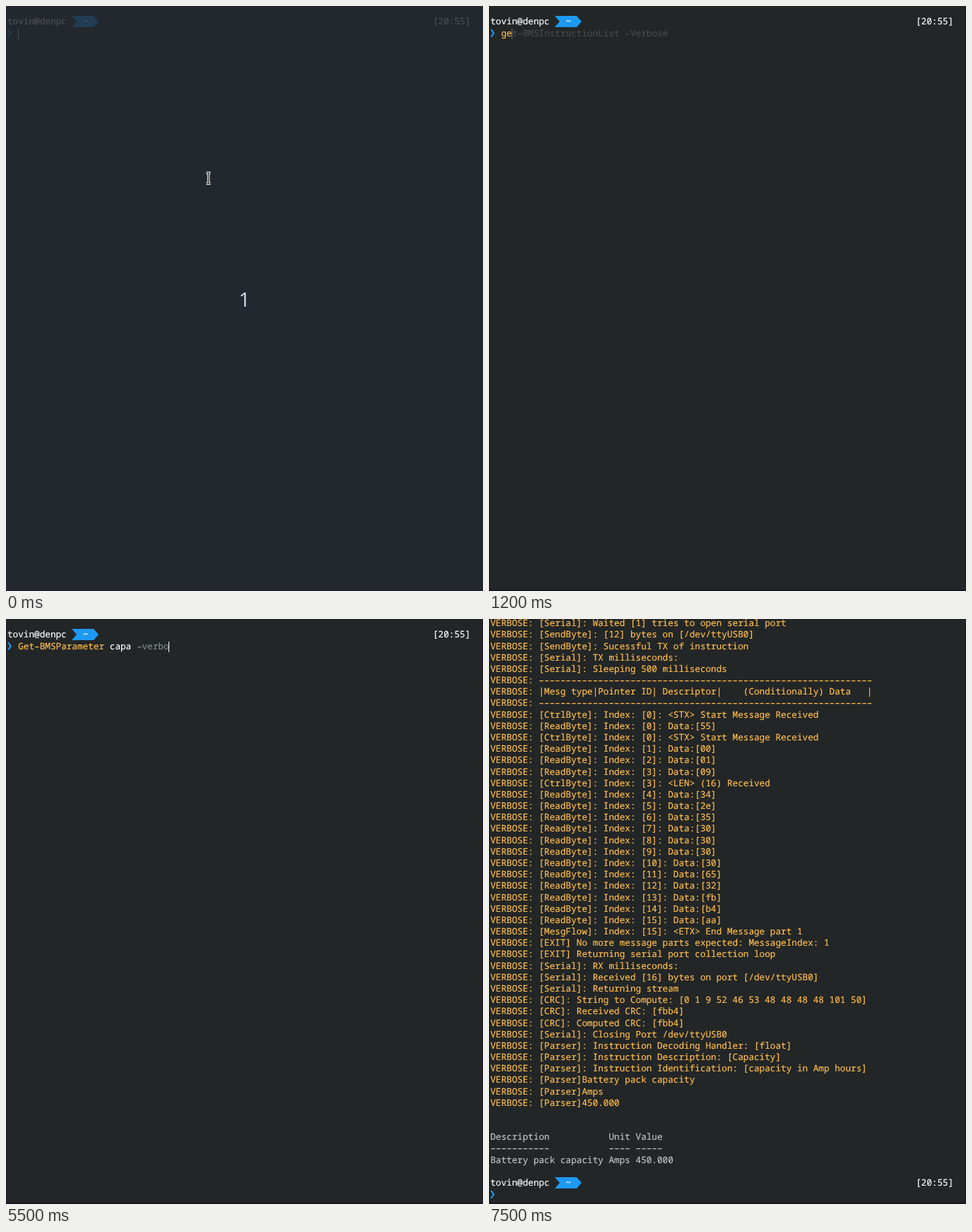
These frames come from a looping animation (675 by 829 pixels, 8000 ms). An HTML page:

```html
<!DOCTYPE html>
<html lang="en">
<head>
<meta charset="utf-8">
<title>Terminal session</title>
<style>
html, body { margin: 0; width: 675px; height: 829px; overflow: hidden; background: #232627; }
#stage { position: relative; width: 675px; height: 829px; overflow: hidden; }
#term, #desk, #veil { position: absolute; inset: 0; overflow: hidden; }
#term {
  background: #232627;
  font: 500 12.7px/14.2px "Noto Sans Mono", "DejaVu Sans Mono", monospace;
  text-rendering: geometricPrecision;
  font-variant-ligatures: none;
  -webkit-text-stroke: .2px;
}
#term span { position: absolute; white-space: pre; }
#term i { position: absolute; background: #1d99f3; }
#term .tag { width: 38px; height: 16px; clip-path: polygon(0 0, 31px 0, 100% 50%, 31px 100%, 0 100%, 7px 50%); }
#term .mark { width: 6px; height: 11px; clip-path: polygon(0 0, 35% 0, 100% 50%, 35% 100%, 0 100%, 55% 50%); }
#term .caret { width: 1px; height: 15px; }
#edge { position: absolute; inset: 0; border: solid #1a1526; border-width: 0 1px 2px; }
#veil { background: #242930; }
#count {
  position: absolute; left: 0; top: 396px; width: 675px; text-align: center;
  font: 28px/38px "Noto Sans", "Open Sans", sans-serif; color: #cbd3e2;
}
#mouse { position: absolute; left: 282px; top: 234px; }
#desk { width: 675px; height: 829px; font-family: "Noto Sans", "Open Sans", sans-serif; }
</style>
</head>
<body>
<div id="stage">
  <div id="term"></div>
  <div id="edge"></div>
  <div id="veil"></div>
  <div id="count">1</div>
  <svg id="mouse" width="9" height="20" fill="none">
    <path d="M1.500 2.500H7.500M1.500 17.500H7.500M4.500 2.500V17.500" stroke="#f4f4f4" stroke-width="3.400"/>
    <path d="M1.500 2.500H7.500M1.500 17.500H7.500M4.500 2.500V17.500" stroke="#16181a" stroke-width="1.200"/>
  </svg>
  <svg id="desk" viewBox="0 0 675 829">
    <defs>
      <radialGradient id="glow" gradientUnits="userSpaceOnUse" cx="0" cy="0" r="1" gradientTransform="translate(0 70) scale(610 1130)">
        <stop offset="0" stop-color="#a0184b"/>
        <stop offset=".25" stop-color="#7a1546"/>
        <stop offset=".5" stop-color="#561240"/>
        <stop offset=".75" stop-color="#3e1038"/>
        <stop offset="1" stop-color="#2a0d30"/>
      </radialGradient>
      <radialGradient id="halo">
        <stop offset="0" stop-color="#d65f88" stop-opacity=".7"/>
        <stop offset=".4" stop-color="#c23f72" stop-opacity=".35"/>
        <stop offset="1" stop-color="#c23f72" stop-opacity="0"/>
      </radialGradient>
      <radialGradient id="ember">
        <stop offset="0" stop-color="#b4601f" stop-opacity=".35"/>
        <stop offset="1" stop-color="#b4601f" stop-opacity="0"/>
      </radialGradient>
    </defs>
    <rect width="675" height="829" fill="url(#glow)"/>
    <path d="M490 470V829H260Z" fill="#220b2b" opacity=".6"/>
    <path d="M490 530V575L335 829H307Z" fill="#46164a" opacity=".25"/>
    <g id="mesh"></g>
    <g id="dots"></g>
    <g id="hexes"></g>
    <path d="M405 803L413 793L427 806L417 817Z" fill="#432452"/>
    <path d="M440 811L457 802V821Z" fill="none" stroke="#b06020" stroke-width="2.500"/>
    <path d="M474 824L482 812L497 829M505 822L521 813L529 826" fill="none" stroke="#7a1544" stroke-width="1.500"/>
    <circle cx="461" cy="780" r="4.500" fill="none" stroke="#8c1743" stroke-width="3"/>
    <circle cx="450" cy="728" r="2.500" fill="#a51c48"/>
    <circle cx="480" cy="656" r="2" fill="#6b3a24"/>

    <path d="M546 95V40Q546 34 552 34H675V95Z" fill="#181824"/>
    <g fill="none" stroke="#e6e8ea">
      <circle cx="559" cy="46" r="2.600" stroke-width="2.400" stroke-dasharray="1.600 .7"/>
      <circle cx="563" cy="51.500" r="2.300" stroke-width="2.200" stroke-dasharray="1.500 .7"/>
      <path d="M561 81H574M561 85H574M561 89H574" stroke-width="2"/>
    </g>
    <path d="M575 48H582" stroke="#2f6fb5" stroke-width="2"/>
    <rect x="587.500" y="73.500" width="100" height="25" fill="#1b1e29" stroke="#44485a"/>
    <text x="593" y="90" font-size="11" fill="#8a8e96">Search</text>

    <rect x="516" y="88" width="159" height="140" fill="#181a25"/>
    <rect x="595" y="87" width="30" height="30" rx="2" fill="#3d4149"/>
    <path d="M590.500 88V118" stroke="#3d4149"/>
    <g fill="none" stroke-width="2">
      <path d="M544 102H533M538 97L533 102L538 107" stroke="#f2f2f2"/>
      <path d="M565 102H576M571 97L576 102L571 107" stroke="#74777e"/>
      <path d="M545 111L548 114L551 111" stroke="#c8cace" stroke-width="1"/>
      <path d="M577 111L580 114L583 111" stroke="#74777e" stroke-width="1"/>
      <path d="M604 98H617M604 102H617M604 106H617" stroke="#eef0f0" stroke-dasharray="2 1.600"/>
      <path d="M636 98H650M636 102H650M636 106H650" stroke="#eef0f0" stroke-dasharray="2 2 10 0"/>
      <path d="M668 98H675M668 102H675M668 106H675" stroke="#eef0f0" stroke-dasharray="2 1.600"/>
    </g>
    <rect x="523" y="149" width="128" height="18" rx="2" fill="#253840"/>
    <text x="526" y="139" font-size="11" fill="#8d9199">Places</text>
    <g font-size="11" fill="#f0f1f2">
      <text x="544.500" y="162">Home</text>
      <text x="544.500" y="181">Desktop</text>
      <text x="544.500" y="200">Documents</text>
      <text x="544.500" y="219">Downloads</text>
      <path d="M527 158L533.500 152L540 158H538V164H535V160H532V164H529V158Z"/>
      <path d="M527 172H540V182H527Z"/>
      <path d="M528 190H535L539 194V202H528Z"/>
      <path d="M532 209H535V215H538L533.500 220L529 215H532Z"/>
    </g>
    <rect x="535" y="177" width="4" height="4" fill="#181a25"/>

    <rect x="628" y="800" width="47" height="29" fill="#1a1526"/>
    <circle cx="649" cy="811" r="4.500" fill="none" stroke="#e6e8ea" stroke-width="3" stroke-dasharray="2 1"/>
    <text x="667" y="815" font-size="11" fill="#e6e8ea">So</text>

    <rect x="485" y="219" width="190" height="589" fill="#15141d"/>
    <rect x="488" y="219" width="187" height="588" fill="#fff"/>
    <circle cx="554" cy="252" r="15" fill="#4285f4"/>
    <path d="M675 233H659A19.500 19.500 0 0 0 659 272H675" fill="none" stroke="#f1e6d8"/>
    <path d="M490 328.500H651" stroke="#ece7d6" stroke-dasharray="3 1"/>
    <path d="M649 326.500H652" stroke="#2272c3" stroke-width="3"/>
    <path d="M659.500 640V692Q659.500 699.500 667 699.500H675" fill="none" stroke="#dedede"/>
    <path d="M676 660Q672 665 676 670M676 683Q672 688 676 693" fill="none" stroke="#eadfc9"/>
    <text x="659" y="742" font-size="12.500" fill="#2b2d30">hos</text>
    <text x="659" y="769" font-size="19.500" fill="#1b4584">Tri</text>
    <text x="659" y="793" font-size="12.500" font-weight="700" fill="#55585c">Tri</text>
    <path d="M660 806H663M668 806H672" stroke="#55585c"/>
    <rect x="651" y="120" width="24" height="531" fill="#232627"/>
  </svg>
</div>
<script>
const LOOP = 8000, CELL = 7.62, ROW = 16.18, LEFT = 2, TOP = -1.8;
const AMBER = '#fdbc4b', WHITE = '#fcfcfc', GREY = '#7f8c8d', GHOST = '#474b4c', PALE = '#bfc3c4';
const $ = id => document.getElementById(id);
const term = $('term');

// Terminal text
const read = (i, byte) => `[ReadByte]: Index: [${i}]: Data:[${byte}]`;
const reads = (bytes, from) => bytes.split(' ').map((b, i) => read(from + i, b));
const verbose = list => list.map(s => 'VERBOSE: ' + s);
const rule = '-'.repeat(62);
const start = '[CtrlByte]: Index: [0]: <STX> Start Message Received';

const build = verbose([
  '[PreProcessor]: Case: Command Type Array of Strings',
  ...['Instruction Validation Success', 'Instruction is Known', 'Battery pack capacity',
    'Null Instruction Data: Asserting to Query'].map(s => '[MsgAssert]: [capa:?]: ' + s),
  ...[' Found [1] instructions to serialize.', ' Processing command encapsulation: [CAPA]',
    '550100 Header (STX)(DST)(SND) appended', '05 Instruction byte count appended',
    '434150413f Instructions appended', '3b e0 Bytes appended',
    'aa Footer assembled (ETX)', ' Assembly complete'].map(s => '[MsgBuilder]:' + s),
  ...['Created serial object', 'PortName : /dev/ttyUSB0', 'BaudRate : 38400', 'Parity : None',
    'DataBits : 8', 'StopBits : One', 'ReadTimeout : 900', 'WriteTimeout : 250',
    'DTREnable : True', 'Serial IsClosed(). Attempting to open.'].map(s => '[Serial]: ' + s)
]);
const send = verbose([
  '[Serial]: Waited [1] tries to open serial port',
  '[SendByte]: [12] bytes on [/dev/ttyUSB0]',
  '[SendByte]: Sucessful TX of instruction',
  '[Serial]: TX milliseconds:',
  '[Serial]: Sleeping 500 milliseconds'
]);
const receive = verbose([
  rule, '|Mesg type|Pointer ID| Descriptor|    (Conditionally) Data   |', rule,
  start, read(0, '55'), start,
  ...reads('00 01 09', 1),
  '[CtrlByte]: Index: [3]: <LEN> (16) Received',
  ...reads('34 2e 35 30 30 30 30 65 32 fb b4 aa', 4),
  '[MesgFlow]: Index: [15]: <ETX> End Message part 1',
  '[EXIT] No more message parts expected: MessageIndex: 1',
  '[EXIT] Returning serial port collection loop',
  '[Serial]: RX milliseconds:',
  '[Serial]: Received [16] bytes on port [/dev/ttyUSB0]',
  '[Serial]: Returning stream',
  '[CRC]: String to Compute: [0 1 9 52 46 53 48 48 48 48 101 50]',
  '[CRC]: Received CRC: [fbb4]',
  '[CRC]: Computed CRC: [fbb4]',
  '[Serial]: Closing Port /dev/ttyUSB0',
  '[Parser]: Instruction Decoding Handler: [float]',
  '[Parser]: Instruction Description: [Capacity]',
  '[Parser]: Instruction Identification: [capacity in Amp hours]',
  '[Parser]Battery pack capacity', '[Parser]Amps', '[Parser]450.000'
]);
const table = [
  'Description           Unit Value',
  '-----------           ---- -----',
  'Battery pack capacity Amps 450.000'
];

// time, typed text, suggestion, caret shown
const hint = 'get-BMSInstructionList -Verbose', cmd = 'Get-BMSParameter', args = 'cell,RINT';
const keys = [
  [0, '', '', 1],
  [1200, 'ge', hint.slice(2), 1],
  [1400, 'get', hint.slice(3), 1],
  [1800, 'get-b', hint.slice(5), 1],
  [2000, 'get-bm', hint.slice(6), 1],
  [2400, 'get-bmsp', 'arameter ' + args, 1],
  [2500, cmd, '', 1],
  [3000, cmd, '', 0],
  [3200, cmd + ' ', args, 1],
  [3700, cmd + ' ', args, 0],
  [4100, cmd + ' c', args.slice(1), 1],
  [4200, cmd + ' ca', '', 1],
  [4500, cmd + ' capa', '', 1],
  [4700, cmd + ' capa ', '', 1],
  [5000, cmd + ' capa -v', '', 1],
  [5100, cmd + ' capa -ve', '', 1],
  [5400, cmd + ' capa -verb', '', 1],
  [5500, cmd + ' capa -verbo', '', 1],
  [5600, cmd + ' capa -verbos', '', 1],
  [5700, cmd + ' capa -verbose', '', 1],
  [6000, cmd + ' capa -verbose', '', 0]
];

function place(node, x, y) {
  node.style.left = x + 'px';
  node.style.top = y + 'px';
  term.append(node);
}
function put(row, col, text, color) {
  const s = document.createElement('span');
  s.textContent = text.replaceAll('-', '–'); // the terminal shows wide hyphens
  s.style.color = color;
  place(s, LEFT + col * CELL, TOP + row * ROW);
}
function shape(cls, x, y, color) {
  const s = document.createElement('i');
  s.className = cls;
  if (color) s.style.background = color;
  place(s, x, y);
}
const lines = (list, row, color) => list.forEach((s, i) => put(row + i, 0, s, color));
const caret = (row, col, color = WHITE) =>
  shape('caret', Math.floor(LEFT + col * CELL), Math.round(TOP + row * ROW) + 1, color);

function prompt(row) {
  const y = Math.round(TOP + row * ROW);
  put(row, 0, 'tovin@denpc', WHITE);
  shape('tag', 93, y);
  put(row, 14, '~', WHITE);
  put(row, 79, '[20:55]', WHITE);
  shape('mark', 2, y + 19);
}
function input([, typed, ghost, shown]) {
  let col = 2;
  typed.split(/(?<= )/).forEach((word, i) => {
    put(2, col, word, i === 0 ? AMBER : word[0] === '-' ? GREY : WHITE);
    col += word.length;
  });
  put(2, col, ghost, GHOST);
  if (shown) caret(2, col, ghost ? '#6a6e6f' : WHITE);
}
function drawTerm(t) {
  term.replaceChildren();
  if (t >= 7500) {
    lines([...send, ...receive], 0, AMBER);
    lines(table, 45, PALE);
    prompt(49);
    return;
  }
  prompt(1);
  input(keys.findLast(k => k[0] <= t));
  if (t >= 6000) lines(build, 3, AMBER);
  if (t >= 7000) lines(send, 26, AMBER);
  if (t >= 7000) caret(31, 0);
  else if (t >= 6000 && t < 6500) caret(26, 0);
}

// Wallpaper
let seed = 7;
const rnd = () => (seed = seed * 16807 % 2147483647) / 2147483647;

function mesh() {
  const w = 62.6, h = 54.6;
  let out = '';
  for (let j = 0; j < 14; j++) {
    for (let i = -1; i < 8; i++) {
      const x = 40 - (j % 2 ? 31.3 : 0) + i * w, y = -3 + j * h;
      const near = Math.max(0, 1 - Math.hypot(x, (y - 80) * .75) / 480);
      const tip = `${x + w / 2} ${y + h}`;
      const tint = rnd() < .5 ? '#c01c4c' : '#2c0c34';
      out += `<path d="M${x} ${y}H${x + w}L${tip}Z" fill="${tint}" opacity="${.01 + rnd() * .05}"/>`;
      for (const d of [`H${x + w}`, `L${tip}`, `L${x - w / 2} ${y + h}`])
        if (rnd() < .45) out += `<path d="M${x} ${y}${d}" stroke="#d01a38" opacity="${near * .5}"/>`;
    }
  }
  $('mesh').innerHTML = out;
}
function dots() {
  const at = [182,37, 104,66, 114,75, 68,72, 253,109, 58,140, 179,135, 25,167, 160,176, 234,189,
    237,207, 38,205, 46,208, 351,209, 315,200, 175,269, 242,274, 52,283, 211,305, 171,327, 207,356,
    130,380, 176,391, 153,459, 117,509, 38,504, 69,450, 235,471, 325,425, 346,375, 352,302, 431,262,
    383,44, 402,55, 432,180, 76,661, 59,653, 72,596, 140,757, 227,726, 271,639, 186,548, 252,557, 239,812];
  let out = '';
  for (let i = 0; i < at.length; i += 2) {
    const c = `<circle cx="${at[i]}" cy="${at[i + 1]}"`;
    out += `${c} r="${4 + rnd() * 3}" fill="url(#halo)"/>${c} r="1.500" fill="#d0608a" opacity=".6"/>`;
  }
  $('dots').innerHTML = out;
}
function hexes() {
  const list = [[465, 688, 10, '#48202f'], [472, 731, 10, '#6a3c22'], [473, 758, 12, '#955523'], [430, 771, 11, '#9c5323']];
  $('hexes').innerHTML = list.map(([x, y, r, fill], i) => {
    const turn = i === 3 ? 0 : Math.PI / 6;
    const pts = [0, 1, 2, 3, 4, 5].map(k => {
      const a = turn + k * Math.PI / 3;
      return `${x + r * Math.cos(a)},${y + r * Math.sin(a)}`;
    });
    const halo = i > 1 ? `<circle cx="${x}" cy="${y}" r="22" fill="url(#ember)"/>` : '';
    return `${halo}<polygon points="${pts.join(' ')}" fill="${fill}"/>`;
  }).join('');
}
mesh();
dots();
hexes();

// Timeline
const cuts = [...new Set([...keys.map(k => k[0]), 300, 400, 500, 600, 900, 1100, 6500, 7000, 7500])].sort((a, b) => a - b);
const show = (id, on) => $(id).style.visibility = on ? 'visible' : 'hidden';
const begin = performance.now();
let last = -1;

function draw() {
  const t = (performance.now() - begin) % LOOP;
  const cut = cuts.findLast(c => c <= t);
  if (cut !== last) {
    last = cut;
    const fade = cut < 300 ? 1 : Math.max(0, (600 - cut) / 400);
    $('veil').style.opacity = .82 * fade;
    $('count').style.opacity = fade;
    show('mouse', cut < 900);
    show('desk', cut === 1100);
    drawTerm(cut);
  }
  requestAnimationFrame(draw);
}
draw();
</script>
</body>
</html>
```
